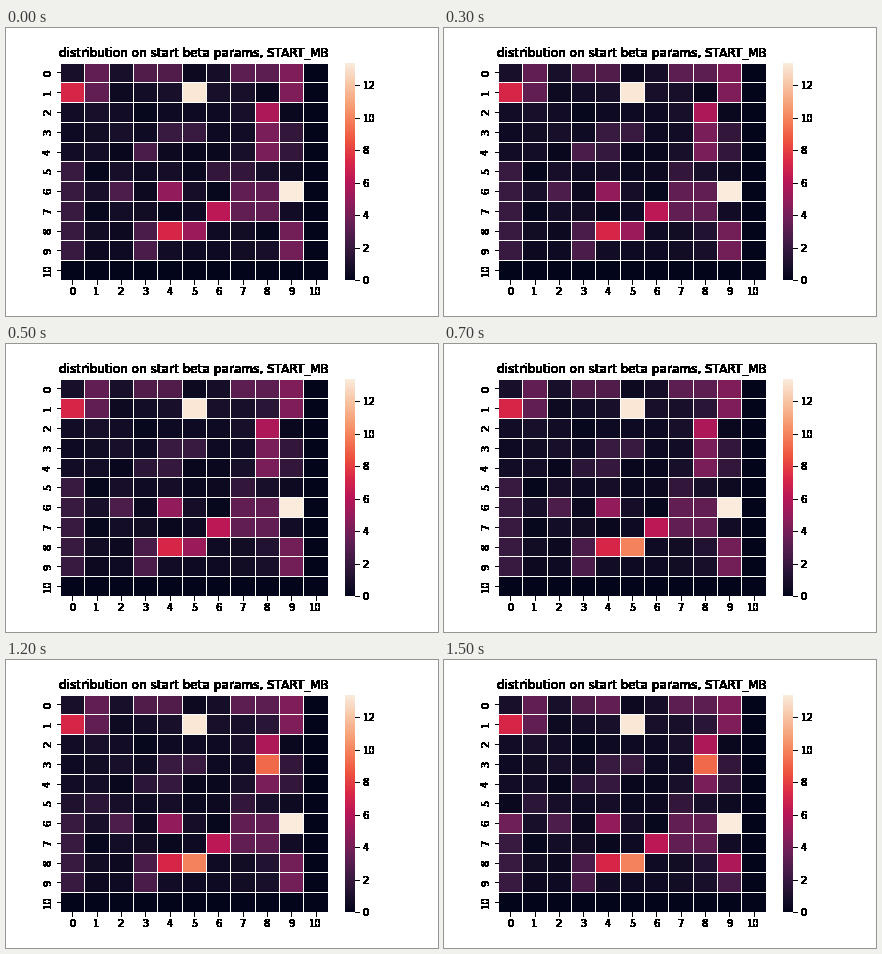
A matplotlib script for the animation above (6.2 s loop, 432 px wide and 288 px high).

```python
import numpy as np
import matplotlib.pyplot as plt
from matplotlib.animation import FuncAnimation
from matplotlib.colors import LinearSegmentedColormap

STEP_MS = 100
LOOP_MS = 6200
VMAX = 13.4
SIZE = 11

ROCKET = LinearSegmentedColormap.from_list("rocket", [
    "#03051A", "#221331", "#451C47", "#6A1F56", "#921C5B", "#B91657",
    "#D92847", "#ED513E", "#F47C56", "#F6A47B", "#F7C9AA", "#FAEBDD"])

# Warm stretches of the grid, then single hot cells.
BANDS = [
    (np.s_[0:2, 1], 3.3), (np.s_[0, 3:5], 2.8), (np.s_[0, 7:9], 3.2),
    (np.s_[0:2, 9], 4.3), (np.s_[2:5, 8], 4.1), (np.s_[3:5, 9], 1.8),
    (np.s_[3, 4:6], 2.0), (np.s_[5:10, 0], 2.0), (np.s_[5, 6:8], 1.8),
    (np.s_[6:8, 7:9], 3.4), (np.s_[8:10, 3], 2.6), (np.s_[8:10, 9], 3.9),
]
PEAKS = [
    ((1, 0), 7.2), ((1, 5), 13.2), ((2, 8), 5.7), ((4, 3), 2.6),
    ((6, 2), 2.7), ((6, 4), 4.9), ((6, 9), VMAX), ((7, 6), 6.2),
    ((8, 4), 7.2), ((8, 5), 5.1),
]

# Time in ms, cell, new value.
EVENTS = [
    (100, (8, 8), 1.2),
    (300, (4, 4), 1.9), (300, (5, 6), 0.4),
    (400, (1, 8), 1.5),
    (500, (4, 3), 1.6),
    (700, (8, 5), 9.9),
    (1100, (3, 8), 9.2),
    (1200, (5, 0), 1.1), (1200, (5, 1), 1.6),
    (1400, (5, 0), 0.3), (1400, (6, 0), 3.8),
    (1500, (0, 4), 3.3), (1500, (8, 9), 5.7), (1500, (9, 9), 2.4),
]


def start_grid():
    """Faint random noise with bands and peaks; last row and column empty."""
    rng = np.random.default_rng(4)
    grid = np.zeros((SIZE, SIZE))
    grid[:-1, :-1] = rng.uniform(0.1, 0.9, (SIZE - 1, SIZE - 1))
    for cells, value in BANDS + PEAKS:
        grid[cells] = value
    return grid


def grid_at(ms):
    grid = start_grid()
    for t, cell, value in EVENTS:
        if t <= ms:
            grid[cell] = value
    return grid


def solid(img, dpi):
    """Make every touched pixel opaque, for hard edges."""
    img[..., 3] = img[..., 3] > 0
    return img, 0, 0


plt.rcParams.update({
    "font.family": "DejaVu Sans", "font.size": 10,
    "axes.titlesize": 12, "axes.titlepad": 6,
})

fig, ax = plt.subplots(figsize=(6, 4), dpi=72, facecolor="white")
fig.subplots_adjust(left=0.125, right=0.9, bottom=0.125, top=0.88)

mesh = ax.pcolormesh(grid_at(0), cmap=ROCKET, vmin=0, vmax=VMAX,
                     linewidths=1, edgecolors="white")
bar = fig.colorbar(mesh, ax=ax)
bar.outline.set_linewidth(0)

ax.spines[:].set_visible(False)
ax.set(xlim=(0, SIZE), ylim=(SIZE, 0))
centers = np.arange(SIZE) + 0.5
ax.set_xticks(centers, range(SIZE))
ax.set_yticks(centers, range(SIZE), rotation="vertical", va="center")
title = ax.set_title("distribution on start beta params, START_MB")

fig.canvas.draw()
for artist in [title, *ax.get_xticklabels(), *ax.get_yticklabels(),
               *ax.get_xticklines(), *ax.get_yticklines(),
               *bar.ax.get_yticklabels(), *bar.ax.get_yticklines()]:
    artist.set_agg_filter(solid)


def update(i):
    mesh.set_array(grid_at(i * STEP_MS))
    return [mesh]


anim = FuncAnimation(fig, update, frames=LOOP_MS // STEP_MS,
                     interval=STEP_MS, repeat=True, repeat_delay=0)
plt.show()
```
